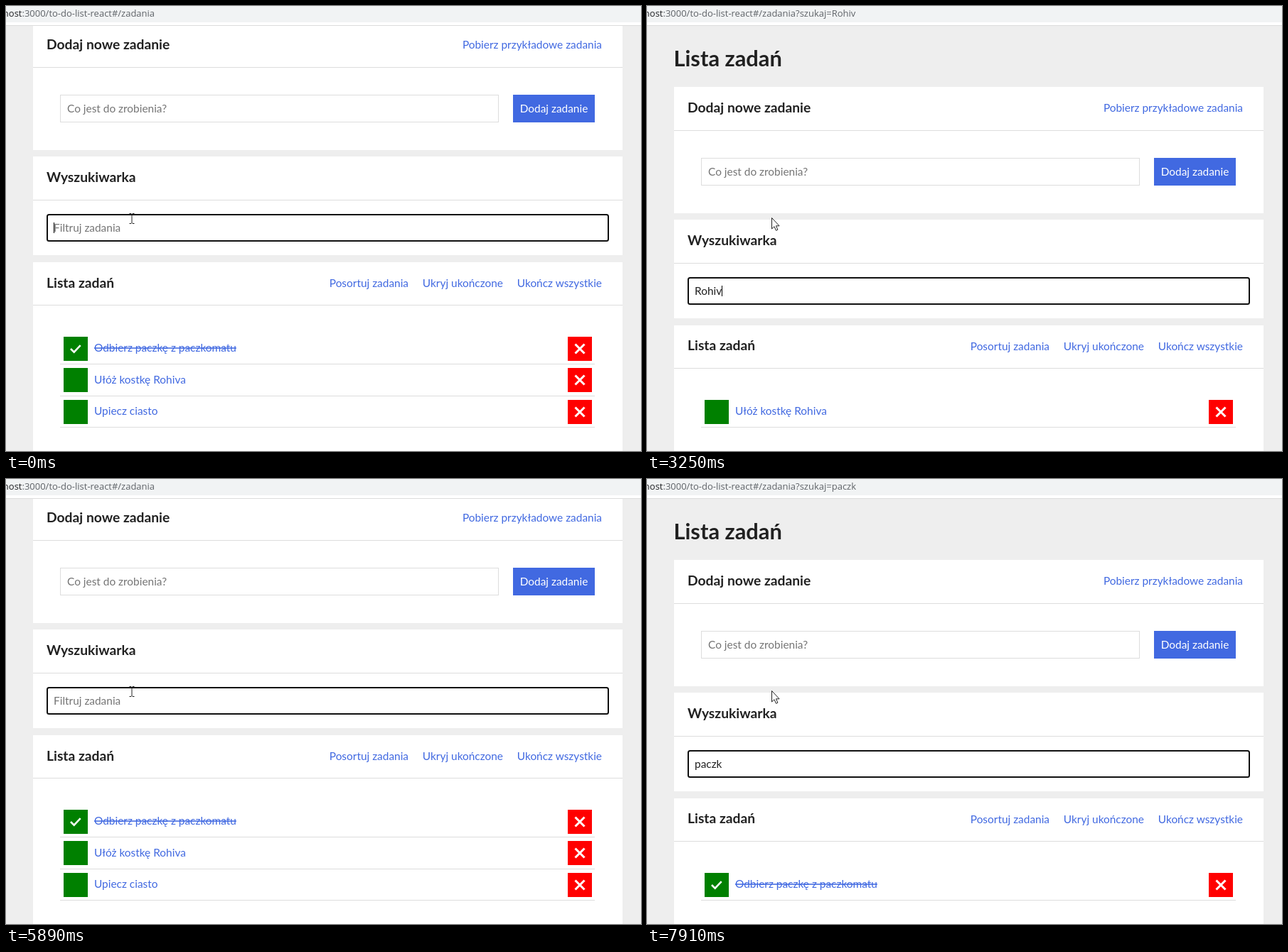
An HTML page that plays this animation: 893 px wide and 627 px high, repeating every 8 s.

```html
<!DOCTYPE html>
<html lang="pl">
<head>
<meta charset="utf-8">
<title>Lista zadań</title>
<style>
  html, body { margin: 0; width: 100%; height: 100%; overflow: hidden; background: #eee; }
  svg { display: block; width: 893px; height: 627px; }
  text { font: 15.42px Lato, sans-serif; fill: #212121; }
  .h1 { font-size: 30.85px; font-weight: 700; }
  .h2 { font-size: 19.28px; font-weight: 700; }
  .link, .task { fill: #4169e1; }
  .link { text-anchor: end; }
  .done { text-decoration: line-through; }
  .hint { fill: #757575; }
  .button { fill: #fff; text-anchor: middle; }
  .url { font: 13px "Open Sans", sans-serif; fill: #5f6368; }
  .host { fill: #202124; }
</style>
</head>
<body>
<svg id="stage" viewBox="0 0 893 627"></svg>
<script>
const LOOP = 8000;
const ROW = 44.45;
const BLUE = '#4169e1', LINE = '#ddd';

const tasks = [
  { name: 'Odbierz paczkę z paczkomatu', done: true },
  { name: 'Ułóż kostkę Rohiva' },
  { name: 'Upiecz ciasto' },
];

// start time, typed text, query in the address, caret visible
const steps = [
  [0, '', '', 1], [70, '', '', 0], [610, '', '', 1], [1140, '', '', 0],
  [1610, 'R', 'R', 1], [1860, 'Ro', 'Ro', 1], [2240, 'Roh', 'Roh', 1],
  [2550, 'Rohi', 'Rohi', 1], [3080, 'Rohi', 'Rohi', 0],
  [3250, 'Rohiv', 'Rohiv', 1], [3800, 'Rohiv', 'Rohiv', 0],
  [4260, 'Rohi', 'Rohiv', 0], [4340, 'Rohi', 'Rohi', 1],
  [4490, 'Roh', 'Roh', 1], [4720, 'Ro', 'Ro', 1],
  [4800, 'R', 'Ro', 1], [4870, 'R', 'R', 0],
  [5040, '', 'R', 0], [5110, '', '', 0], [5340, '', '', 1], [5890, '', '', 0],
  [6120, 'p', '', 1], [6200, 'p', 'p', 1], [6280, 'pa', 'p', 1], [6350, 'pa', 'pa', 1],
  [6580, 'pac', 'pac', 1], [6660, 'pacz', 'pacz', 1], [7060, 'paczk', 'paczk', 1],
  [7360, 'paczko', 'paczko', 1], [7910, 'paczk', 'paczk', 0],
];

const stage = document.getElementById('stage');
const pen = document.createElement('canvas').getContext('2d');

const rect = (x, y, w, h, fill) =>
  `<rect x="${x}" y="${y}" width="${w}" height="${h}" fill="${fill}"/>`;
const text = (x, y, cls, str) => `<text x="${x}" y="${y}" class="${cls}">${str}</text>`;
const path = (d, stroke, width, fill = 'none') =>
  `<path d="${d}" stroke="${stroke}" stroke-width="${width}" fill="${fill}"/>`;

function textWidth(str) {
  pen.font = '15.42px Lato, sans-serif';
  return pen.measureText(str).width;
}

function taskRow(task, fromBottom) {
  const y = base => Math.round(base - fromBottom * ROW);
  const top = y(554.8);
  return rect(81, top, 34, 34, '#008000') +
    (task.done ? path(`M91 ${top + 17}l4.7 4.6 9-9.4`, '#fff', 2.6) : '') +
    text(124, y(576.3), task.done ? 'task done' : 'task', task.name) +
    rect(790, top, 34, 34, '#f00') +
    path(`M800.5 ${top + 10.5}l13 13m0-13l-13 13`, '#fff', 3) +
    rect(76, y(593.3), 752, 1, LINE);
}

function page(typed, caret) {
  const shown = tasks.filter(t => t.name.toLowerCase().includes(typed.toLowerCase()));
  const shift = (tasks.length - shown.length) * ROW;
  const y = base => Math.round(base + shift);
  const card = (top, bottom, line) =>
    rect(38, y(top), 829, y(bottom) - y(top), '#fff') + rect(38, y(line), 829, 1, LINE);
  const caretX = Math.round(67 + textWidth(typed));

  return text(37.5, y(-3.9), 'h1', 'Lista zadań') +
    card(24.8, 202.6, 86) +
    text(57, y(60.7), 'h2', 'Dodaj nowe zadanie') +
    text(838, y(60), 'link', 'Pobierz przykładowe zadania') +
    rect(76, y(125.3), 617, 39, LINE) +
    rect(77, y(125.3) + 1, 615, 37, '#fff') +
    text(86, y(149.6), 'hint', 'Co jest do zrobienia?') +
    rect(713, y(125.3), 115, 39, BLUE) +
    text(770.5, y(149.6), 'button', 'Dodaj zadanie') +

    card(212.2, 350.8, 273.3) +
    text(57, y(247.7), 'h2', 'Wyszukiwarka') +
    `<rect x="58" y="${y(293.3) + 1}" width="789" height="37" rx="2.5" fill="#fff" stroke="#101010" stroke-width="2"/>` +
    text(67, y(317.6), typed ? '' : 'hint', typed || 'Filtruj zadania') +
    (caret ? rect(caretX, y(305), 1, 15, '#000') : '') +

    card(360.6, 700, 421.4) +
    text(57, y(396.5), 'h2', 'Lista zadań') +
    text(566, y(395.7), 'link', 'Posortuj zadania') +
    text(699, y(395.7), 'link', 'Ukryj ukończone') +
    text(838, y(395.7), 'link', 'Ukończ wszystkie') +
    shown.map((t, i) => taskRow(t, shown.length - 1 - i)).join('');
}

function addressBar(query) {
  const tail = query ? '?szukaj=' + query : '';
  return rect(0, 0, 893, 23, '#f1f3f4') + rect(0, 23, 893, 4, '#fff') +
    rect(0, 27, 893, 1, '#dcdcdc') +
    text(-4.2, 15, 'url', `<tspan class="host">host</tspan>:3000/to-do-list-react#/zadania${tail}`);
}

const pointer = overInput => overInput
  ? path('M173.5 292.5h2.5l1 1 1-1h2.5M177 293.5v12M173.5 306.5h2.5l1-1 1 1h2.5', '#222', 1)
  : path('M175.5 298.5v15.5l3.5-3.3 2.5 5.6 2.4-1.1-2.4-5.4h4.6z', '#222', 1, '#fff');

let current = null;

function tick() {
  const time = performance.now() % LOOP;
  const step = steps.findLast(s => s[0] <= time);
  if (step !== current) {
    current = step;
    const [, typed, query, caret] = step;
    stage.innerHTML = rect(0, 0, 893, 627, '#eee') + page(typed, caret) +
      addressBar(query) + pointer(!typed);
  }
  requestAnimationFrame(tick);
}
tick();
</script>
</body>
</html>
```
